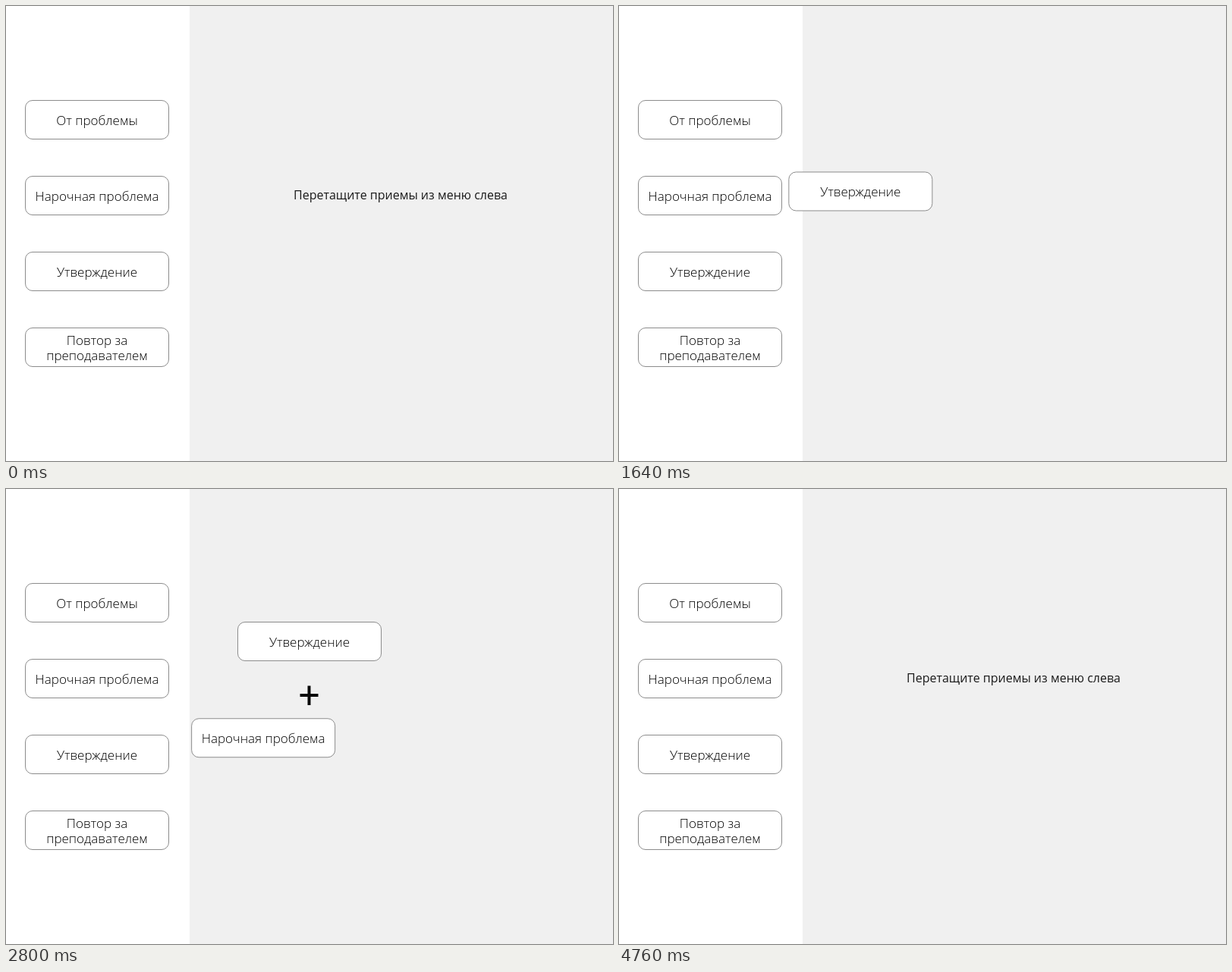
Write an HTML page that moves like this. It is 800 px wide and 600 px high and loops after 4.8 s.

```html
<!DOCTYPE html>
<html lang="ru">
<head>
<meta charset="utf-8">
<title>Конструктор приемов</title>
<style>
  html, body { margin: 0; width: 100%; height: 100%; overflow: hidden; background: #f0f0f0; }
  body { position: relative; font: 300 17px/20px "Open Sans", "Noto Sans", sans-serif; color: #000; }
  .menu { position: absolute; left: 0; top: 0; width: 242px; height: 600px; background: #fff; }
  .card {
    position: absolute; left: 0; top: 0; width: 190px; height: 52px; box-sizing: border-box;
    border: 1px solid #8c8c8c; border-radius: 10px; background: #fff;
    display: flex; align-items: center; justify-content: center;
    padding-top: 2px; text-align: center; white-space: pre;
  }
  #hint {
    position: absolute; left: 320px; width: 400px; top: 239px; text-align: center;
    font-weight: 400; font-size: 16px; font-stretch: 87%; white-space: nowrap; color: #1a1a1a;
  }
  svg { position: absolute; left: 0; top: 0; }
</style>
</head>
<body>
<div class="menu"></div>
<div id="hint">Перетащите приемы из меню слева</div>
<svg width="800" height="600" stroke="#0a0a0a" fill="none">
  <path id="plus" stroke-width="4" d="M387.5 272h24M399.5 259.5v25.5"/>
  <path id="equals" stroke-width="3.5" d="M516.5 266.2h21M516.5 275.8h21"/>
</svg>
<script>
const LOOP = 4800, STEP = 40, FADE = 200;
const $ = id => document.getElementById(id);
const ramp = (t, start, length) => Math.min(1, Math.max(0, (t - start) / length));

function place(el, x, y) {
  el.style.transform = `translate(${x}px, ${y}px)`;
}

function card(text, x, y) {
  const el = document.createElement('div');
  el.className = 'card';
  el.textContent = text;
  place(el, x, y);
  document.body.append(el);
  return el;
}

const labels = ['От проблемы', 'Нарочная проблема', 'Утверждение', 'Повтор за\nпреподавателем'];
labels.forEach((text, i) => card(text, 25, 124 + 100 * i));

const drags = [
  { el: card(labels[2], 25, 324), from: 324, to: 175, start: 960, length: 960 },
  { el: card(labels[1], 25, 224), from: 224, to: 324, start: 2080, length: 920 }
];
const result = card(labels[0], 565, 245.5);

function draw(now) {
  const t = Math.floor(now % LOOP / STEP) * STEP;
  const reset = ramp(t, 4560, FADE), shown = 1 - reset;

  for (const d of drags) {
    const p = ramp(t, d.start, d.length);
    place(d.el, 25 + 280 * p, d.from + (d.to - d.from) * p);
    d.el.style.opacity = p > 0 ? shown : 0;
  }
  $('hint').style.opacity = Math.max(1 - ramp(t, 1440, FADE), reset);
  $('plus').style.opacity = ramp(t, 1920, FADE) * shown;
  $('equals').style.opacity = result.style.opacity = ramp(t, 3000, FADE) * shown;
  requestAnimationFrame(draw);
}
requestAnimationFrame(draw);
</script>
</body>
</html>
```
